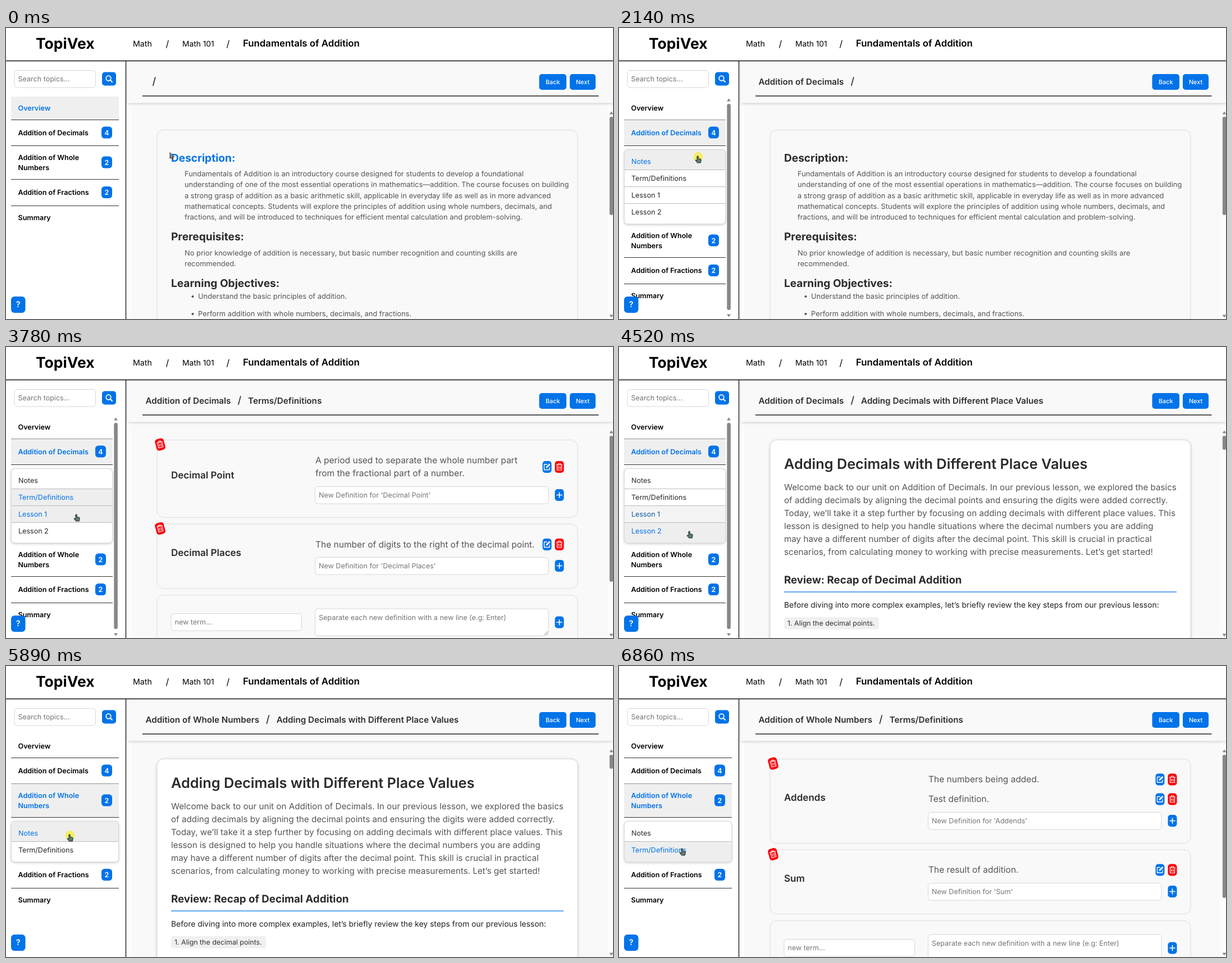
Animation, 1081 px wide and 518 px high, one loop 8 s. Source, as an HTML page:

```html
<!DOCTYPE html>
<html lang="en">
<head>
<meta charset="utf-8">
<style>
  html, body { margin: 0; width: 100%; height: 100%; overflow: hidden; background: #fff; }
  svg { display: block; }
  text { font-family: Inter, "Open Sans", sans-serif; font-optical-sizing: none; text-rendering: geometricPrecision; white-space: pre; }
</style>
</head>
<body>
<svg id="stage" width="1081" height="518" viewBox="0 0 1081 518"></svg>
<script>
const LOOP = 8000, BLUE = '#0073e9', RED = '#fb0007', DARK = '#2b2b2b', GREY = '#555', HINT = '#757575';
const SMALL = 12.55, BODY = 12.87, LARGE = 15.5, HEADING = 19.1;
const stage = document.getElementById('stage');

// ---- time helpers
const ramp = (t, from, length = 200) => Math.min(1, Math.max(0, (t - from) / length));
const smooth = p => p * p * (3 - 2 * p);
const lit = (t, on, off = Infinity) => ramp(t, on) - ramp(t, off);
const phase = (t, list) => list.filter(([start]) => t >= start).pop()[1];
const mix = (a, b, p) => 'rgb(' + a.map((v, i) => Math.round(v + (b[i] - v) * p)) + ')';
const tint = (dark, p) => mix([dark, dark, dark], [0, 115, 233], p);

// ---- drawing helpers
const text = (x, y, size, str, fill = GREY, weight = 400, extra = '') =>
  `<text x="${x}" y="${y}" font-size="${size}" font-weight="${weight}" fill="${fill}" ${extra}>${str}</text>`;
const lines = (x, y, pitch, size, list, fill) =>
  list.map((str, i) => text(x, y + i * pitch, size, str, fill)).join('');
const box = (x, y, w, h, r, fill, stroke = 'none', extra = '') =>
  `<rect x="${x}" y="${y}" width="${w}" height="${h}" rx="${r}" fill="${fill}" stroke="${stroke}" ${extra}/>`;
const rule = (x1, y1, x2, y2, color = '#111', width = 1.3) =>
  `<path d="M${x1} ${y1}L${x2} ${y2}" stroke="${color}" stroke-width="${width}"/>`;
const path = (d, fill = 'none', stroke = 'none', width = 1.3) =>
  `<path d="${d}" fill="${fill}" stroke="${stroke}" stroke-width="${width}" stroke-linejoin="round" stroke-linecap="round"/>`;
const at = (x, y, content, turn = 0) => `<g transform="translate(${x} ${y}) rotate(${turn})">${content}</g>`;
const shadow = 'style="filter:drop-shadow(0 1px 2px #0003)"';
const centred = 'text-anchor="middle"';

const tile = (fill, h = 21) => box(-8, -h / 2, 16, h, 5, fill);
const trash = (x, y, turn) => at(x, y, tile(RED) +
  path('M-5 -4H5M-2 -4V-6H2V-4M-4 -3.5V5.5H4V-3.5M-1.5 -1V3M1.5 -1V3', 'none', '#fff', 1.2), turn);
const edit = (x, y) => at(x, y, tile(BLUE) +
  path('M0 -4.5H-5V5H4.5V1', 'none', '#fff') + path('M-2 2L-1.5 -0.5L4 -6L6 -4L0.5 1.5Z', '#fff'));
const plus = (x, y) => at(x, y, tile(BLUE) + path('M-4.5 0H4.5M0 -4.5V4.5', 'none', '#fff', 1.7));
const star = (x, y, fill) => {
  const points = Array.from({ length: 10 }, (_, i) => {
    const r = i % 2 ? 2.7 : 6, a = i * Math.PI / 5;
    return (r * Math.sin(a)).toFixed(2) + ' ' + (-r * Math.cos(a)).toFixed(2);
  });
  return at(x, y, tile(BLUE, 17) + path('M' + points.join('L') + 'Z', fill));
};
const input = (x, y, w, hint, h = 30.5) => box(x, y, w, h, 5, '#fff', '#d6d6d6') + text(x + 6.5, y + 19.5, SMALL, hint, HINT);
const card = (y, h, w = 749, fill = 'none', extra = '') => box(269, y, w, h, 12, fill, '#dcdcdc', extra);

const scrollbar = (x, top, bottom, from, to) =>
  path(`M${x - 3.5} ${top + 2.5}h7l-3.5 -5zM${x - 3.5} ${bottom - 2.5}h7l-3.5 5z`, '#888') +
  box(x - 3.2, from, 6.6, to - from, 3.3, '#888');
const pageScroll = to => box(1071, 134, 10, 384, 0, '#fcfcfc') + scrollbar(1078, 151, 513, 158, to);

// ---- pages
const bullet = (y, str) => `<circle cx="332.5" cy="${y - 4}" r="2.1" fill="${GREY}"/>` + text(342, y, BODY, str);

function overviewPage(t) {
  return card(181.5, 400) +
    text(294, 237.5, HEADING, 'Description:', tint(43, 1 - ramp(t, 70)), 700) +
    lines(318, 264, 19.3, BODY, [
      'Fundamentals of Addition is an introductory course designed for students to develop a foundational',
      'understanding of one of the most essential operations in mathematics—addition. The course focuses on building',
      'a strong grasp of addition as a basic arithmetic skill, applicable in everyday life as well as in more advanced',
      'mathematical concepts. Students will explore the principles of addition using whole numbers, decimals, and',
      'fractions, and will be introduced to techniques for efficient mental calculation and problem-solving.']) +
    text(294, 378, HEADING, 'Prerequisites:', DARK, 700) +
    lines(318, 405, 19.3, BODY, [
      'No prior knowledge of addition is necessary, but basic number recognition and counting skills are',
      'recommended.']) +
    text(294, 461, HEADING, 'Learning Objectives:', DARK, 700) +
    bullet(482, 'Understand the basic principles of addition.') +
    bullet(513, 'Perform addition with whole numbers, decimals, and fractions.') +
    pageScroll(333);
}

const noteCard = (y, h) => card(y, h, 760, '#f2f2f2');
const newNote = y => noteCard(y, 68) + input(299.5, y + 18.5, 699, 'new note...') + plus(1014.5, y + 33.5);

function footer() {
  const links = [[456, 'About'], [515.5, 'Terms of Service'], [638, 'Privacy Policy'], [743, 'Help'], [794, 'Contact']];
  return box(214, 436.5, 867, 82, 0, '#282c35') +
    links.map(([x, label]) => text(x, 468, SMALL, label, '#61dafb')).join('') +
    text(649.5, 496, 10.8, 'Copyright © 2024 <tspan fill="#61dafb">Tobin Marrowel</tspan>. All rights reserved.',
      '#fff', 400, centred);
}

const decimalNotes = () =>
  noteCard(165.5, 61) + star(284, 196, '#ffc107') +
  text(300, 201, LARGE, 'When adding decimals, line up the decimal points.', '#333') +
  edit(1014.5, 182.5) + trash(1014.5, 209) +
  noteCard(237.5, 83) + star(284, 279, '#fff') +
  lines(300, 273, 23, LARGE, [
    'If the numbers have different number of decimal places, add zeros to the right of the number',
    'with fewer decimal places.'], '#333') +
  edit(1014.5, 262) + trash(1014.5, 296) +
  newNote(332) + footer();

const wholeNotes = () => newNote(165.5) + footer();

// defs: [centre of the buttons, first baseline, ...text lines]
const termCard = (y, h, term, termY, defs, inputY) =>
  card(y, h) + trash(274.5, y + 8, -15) + text(294, termY, 17, term, DARK, 600) +
  defs.map(([mid, base, ...strs]) => lines(551, base, 23, LARGE, strs) + edit(963.5, mid) + trash(985.5, mid)).join('') +
  input(550.5, inputY, 415.5, `New Definition for '${term}'`) + plus(985.5, inputY + 15);

const newTerm = y => card(y, 120) + input(294, y + 33, 232.5, 'new term...') +
  input(550.5, y + 24.5, 415.5, 'Separate each new definition with a new line (e.g: Enter)', 48) +
  path(`M958.5 ${y + 71}l6 -6M962 ${y + 71}l2.5 -2.5`, 'none', '#777', 0.9) + plus(985.5, y + 48.5);

const decimalTerms = () =>
  termCard(165.5, 138, 'Decimal Point', 234, [[213.5, 207,
    'A period used to separate the whole number part', 'from the fractional part of a number.']], 248.5) +
  termCard(315, 115, 'Decimal Places', 371.5, [[351.5, 356.5, 'The number of digits to the right of the decimal point.']], 374.5) +
  newTerm(441.5) + pageScroll(418);

const wholeTerms = () =>
  termCard(165.5, 150, 'Addends', 240, [[202, 207, 'The numbers being added.'], [237, 242, 'Test definition.']], 260.5) +
  termCard(327, 114.5, 'Sum', 383.5, [[363, 368, 'The result of addition.']], 386.5) +
  newTerm(453.5) + pageScroll(413);

const LESSON = 'Adding Decimals with Different Place Values';
const lessonPage = () =>
  card(165.5, 400, 749, '#fff', shadow) +
  text(294, 217, 25.3, LESSON, DARK, 600) +
  lines(294, 255, 23, 15.2, [
    'Welcome back to our unit on Addition of Decimals. In our previous lesson, we explored the basics',
    'of adding decimals by aligning the decimal points and ensuring the digits were added correctly.',
    'Today, we’ll take it a step further by focusing on adding decimals with different place values. This',
    'lesson is designed to help you handle situations where the decimal numbers you are adding',
    'may have a different number of digits after the decimal point. This skill is crucial in practical',
    'scenarios, from calculating money to working with precise measurements. Let’s get started!']) +
  text(294, 421, 18.7, 'Review: Recap of Decimal Addition', DARK, 700) +
  rule(294, 436, 993, 436, '#2f8bee', 1.5) +
  text(294, 463.5, 13.9, 'Before diving into more complex examples, let’s briefly review the key steps from our previous lesson:', '#222') +
  box(294, 481, 169, 21.5, 4, '#f0f0f0') + text(300, 496, 12.4, '1. Align the decimal points.', '#333') +
  pageScroll(183);

const PAGES = [
  [0, [overviewPage, '']],
  [2210, [decimalNotes, 'Notes']],
  [3240, [decimalTerms, 'Terms/Definitions']],
  [3990, [lessonPage, LESSON]],
  [5960, [wholeNotes, 'Notes']],
  [6660, [wholeTerms, 'Terms/Definitions']]
];
const TOPICS = [[0, ''], [1530, 'Addition of Decimals'], [5280, 'Addition of Whole Numbers']];

// ---- frame around the pages
function header() {
  const button = (x, w, label) => box(x, 82, w, 28, 5, BLUE) + text(x + w / 2, 100, 10.8, label, '#fff', 500, centred);
  return {
    top: box(0, 0, 1081, 59, 0, '#fff') + text(53, 37, 26.5, 'TopiVex', '#000', 700) +
      text(226, 33, 14.2, 'Math', '#000') + text(284.5, 33.5, 16, '/', '#000') + text(314, 33, 13.8, 'Math 101', '#000') +
      text(392.5, 33.5, 16, '/', '#000') + text(422, 33, 16.8, 'Fundamentals of Addition', '#000', 600) +
      rule(0, 58.5, 1081, 58.5) + rule(213.5, 59, 213.5, 518),
    bar: box(217, 59, 864, 74.5, 0, '#f9f9f9', 'none', shadow) + rule(243, 121, 1055.5, 121, '#222', 1.6) +
      button(949.5, 48.5, 'Back') + button(1004, 46, 'Next')
  };
}
const frame = header();

function main(t) {
  const [page, title] = phase(t, PAGES);
  return box(214, 59, 867, 459, 0, '#fcfcfc') + box(224, 59, 857, 459, 0, '#f9f9f9') + page(t) + frame.bar +
    text(248.5, 101, 15.2,
      `${phase(t, TOPICS)}<tspan dx="12" font-size="18" font-weight="500">/</tspan><tspan dx="12">${title}</tspan>`, '#2f2f2f', 600);
}

// ---- sidebar; each row gives its highlight times and an optional submenu
const ROWS = [
  { labels: ['Overview'], height: 41.5, glow: [-500, 1530] },
  { labels: ['Addition of Decimals'], height: 46, badge: 4, glow: [1150, 5280], open: [1530, 5280],
    items: [['Notes', 1900, 3240], ['Term/Definitions', 2580, 3990], ['Lesson 1', 3560, 4450], ['Lesson 2', 4130]] },
  { labels: ['Addition of Whole', 'Numbers'], height: 60, badge: 2, glow: [4850], open: [5280],
    items: [['Notes', 5640, 6660], ['Term/Definitions', 6230]] },
  { labels: ['Addition of Fractions'], height: 47, badge: 2, glow: [LOOP] },
  { labels: ['Summary'], height: 42, glow: [LOOP] }
];

function submenu(items, y, w, open, t) {
  const height = (30 * items.length + 12.5) * open;
  const content = items.map(([label, on, off], i) => {
    const p = lit(t, on, off), first = i === 0, last = i === items.length - 1;
    const top = first ? 0 : 6 + 30 * i, h = first || last ? 36.5 : 30;
    return box(0, top, w, h, 0, '#eee', 'none', `opacity="${p}"`) +
      text(12.5, 25.3 + 30 * i, SMALL, label, tint(40, p)) +
      (first ? '' : rule(0, top, w, top, '#bbb', 1));
  }).join('');
  return box(9.5, y, w, height, 6, '#fff', '#ddd', shadow) +
    `<svg x="9.5" y="${y}" width="${w}" height="${height}">${content}</svg>` +
    box(9.5, y, w, height, 6, 'none', '#d8d8d8');
}

function sidebar(t) {
  const scrolls = t >= 1600 && t < 5350, right = scrolls ? 190 : 201;
  let y = 122, out = box(0, 59, 213, 459, 0, '#fff') + input(15, 75.5, 144.5, 'Search topics...') +
    box(171, 78.5, 25, 24, 5, BLUE) + path('M186 93L189 96', 'none', '#fff', 2) +
    '<circle cx="182.5" cy="89.5" r="4.3" fill="none" stroke="#fff" stroke-width="1.7"/>';
  ROWS.forEach((row, i) => {
    const p = lit(t, ...row.glow), mid = y + row.height / 2 - (i ? 0.5 : 0.7);
    out += box(9, y, right - 9, row.height, 0, '#efefef', 'none', `opacity="${p}"`);
    row.labels.forEach((label, n) => {
      out += text(21.5, mid + 4.7 + (n - (row.labels.length - 1) / 2) * 17.6, SMALL, label, tint(0, p), 600);
    });
    if (row.badge) {
      out += box(right - 31, mid - 10.5, 19, 21, 5.5, BLUE) +
        text(right - 21.5, mid + 4.5, 12.5, row.badge, '#fff', 600, centred);
    }
    y += row.height;
    if (i < ROWS.length - 1) out += rule(9, y, right, y, '#333', 1.1);
    const open = row.open ? smooth(lit(t, ...row.open)) : 0;
    if (open > 0) {
      out += submenu(row.items, y + 7 * open, right - 10, open, t);
      y += (30 * row.items.length + 19) * open;
    }
  });
  if (scrolls) out += scrollbar(195.5, 128, 512, 135, 502);
  return out + box(9, 478, 25.5, 29, 6, BLUE) + text(21.7, 497.3, 14.5, '?', '#fff', 600, centred);
}

// ---- pointer
const MOVES = [
  [0, 292, 222], [70, 292, 222], [830, 230, 202], [900, 228, 199], [1320, 155, 187], [1600, 155, 187], [2070, 140, 228],
  [2410, 140, 228], [2690, 127, 266], [3330, 127, 266], [3710, 125, 298], [4040, 125, 298], [4250, 125, 328],
  [4590, 125, 328], [5010, 118, 372], [5330, 118, 372], [5820, 113, 300], [6030, 113, 300], [6380, 112, 325], [LOOP, 112, 325]
];
const CLICKS = [[1460, 1600], [2100, 2280], [3100, 3240], [3850, 3990], [4250, 4520], [5210, 5330], [5850, 6030], [6520, 6660]];

function pointer(t) {
  const n = MOVES.findIndex(([time]) => time > t);
  const [t0, x0, y0] = MOVES[n - 1], [t1, x1, y1] = MOVES[n];
  const p = smooth((t - t0) / (t1 - t0)), x = x0 + (x1 - x0) * p, y = y0 + (y1 - y0) * p;
  const glow = CLICKS.some(([from, to]) => t >= from && t < to)
    ? '<circle cx="1" cy="1.5" r="8.5" fill="#f7ee2b" opacity=".7"/>' : '';
  const shape = x < 202
    ? path('M-1 0.5Q0.3 -1 1.3 0.5V4.5L4.5 5Q6.5 5.3 6.3 7.5L5.2 12H-0.5L-4 7.5Q-3.5 6 -1 7.5Z', '#5b8174', '#222', 1)
    : path('M0 0V10.5L2.4 8.4L4 12L5.6 11.2L4 7.7L7.2 7.4Z', '#8a8a8a', '#333', 1);
  return at(x.toFixed(2), y.toFixed(2), glow + shape);
}

let shown = '';
function draw(now) {
  const t = now % LOOP;
  const picture = main(t) + sidebar(t) + frame.top + pointer(t);
  if (picture !== shown) stage.innerHTML = shown = picture;
  requestAnimationFrame(draw);
}
draw(0);
</script>
</body>
</html>
```
